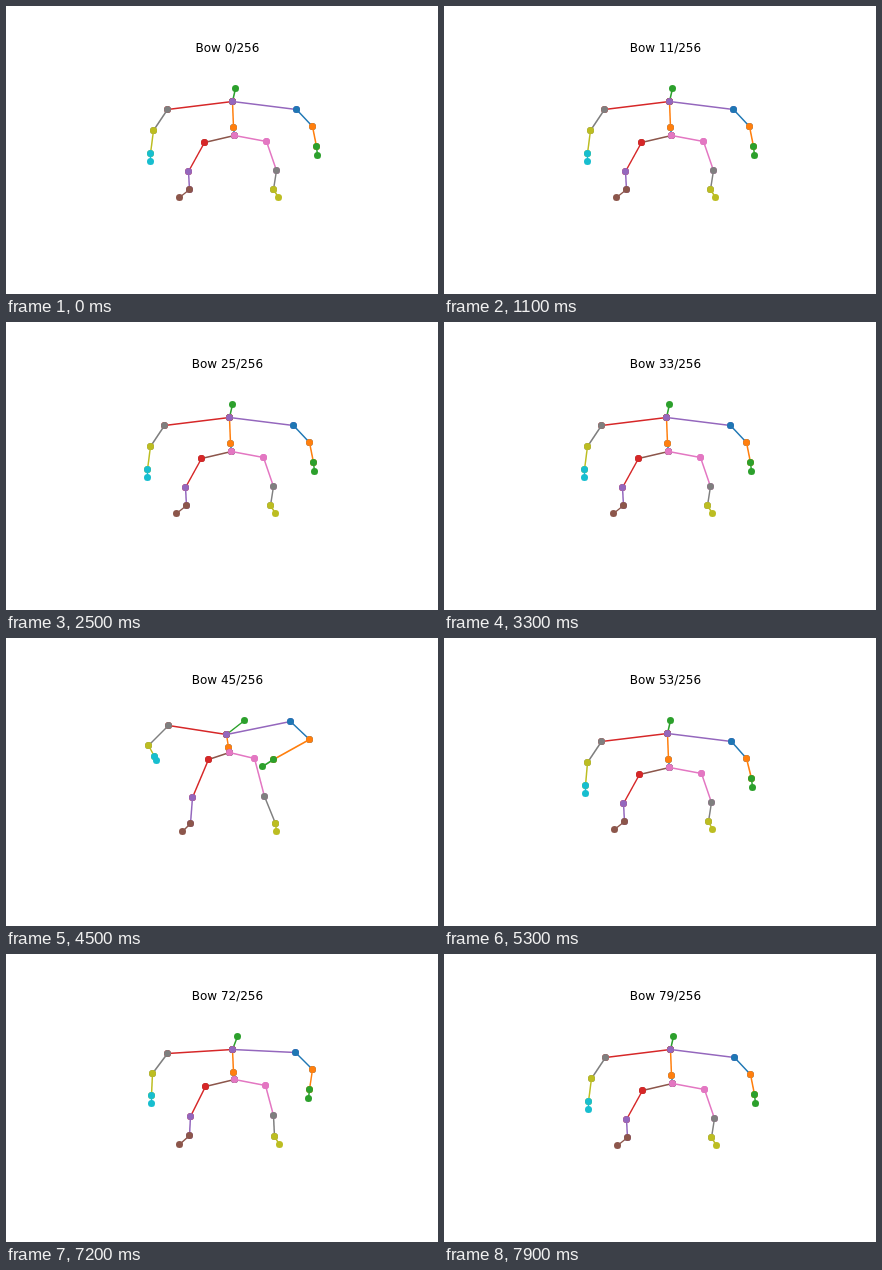
An HTML page with a canvas for the animation above (8 s loop, 432 px wide and 288 px high).

```html
<!DOCTYPE html>
<html lang="en">
<head>
<meta charset="utf-8">
<title>Bow</title>
<style>
  html, body { margin: 0; width: 100%; height: 100%; overflow: hidden; background: #fff; }
  canvas, svg { position: absolute; left: 0; top: 0; display: block; }
  text { font: 12px "DejaVu Sans", sans-serif; text-anchor: middle; fill: #000; }
</style>
</head>
<body>
<canvas id="stage" width="432" height="288"></canvas>
<svg width="432" height="288"><text id="title" x="221.4" y="46">Bow 0/256</text></svg>
<script>
const ctx = document.getElementById('stage').getContext('2d');
const title = document.getElementById('title');
const STEP = 100, COUNT = 80, TOTAL = 256;

const COLORS = ['#1f77b4', '#ff7f0e', '#2ca02c', '#d62728', '#9467bd',
  '#8c564b', '#e377c2', '#7f7f7f', '#bcbd22', '#17becf'];

// Four joints per limb, from the body outwards; the trunk is hip, spine, neck, head.
const LIMBS = ['trunk', 'armL', 'armR', 'legL', 'legR'];
const STAND = {
  trunk: [[226, 129], [225, 121], [224, 95], [227, 82]],
  armL: [[158.5, 103], [144.5, 123.5], [142, 146.5], [142, 155]],
  armR: [[288, 103], [303.5, 120], [308, 140], [309, 149]],
  legL: [[196, 135.5], [180, 165], [181, 182.5], [171, 191]],
  legR: [[258, 135], [268, 164], [265, 183], [269.5, 191]]
};
const BENT = {
  trunk: [[225, 118], [224, 115], [221, 97], [250, 82]],
  armL: [[171, 87], [144, 106], [161, 102], [166, 101]],
  armR: [[284, 84], [307, 102], [242, 122], [222, 128]],
  legL: [[210, 125], [193, 169], [190, 201], [183, 210]],
  legR: [[244, 125], [255, 168], [275, 201], [274, 209]]
};

// reach: how far the left arm follows; wide: how much the knees turn in and feet out
const BOWS = [
  { from: 12, to: 25, reach: 1, wide: 0 },
  { from: 35, to: 47.8, reach: 0.75, wide: 0 },
  { from: 61, to: 73, reach: 0.5, wide: 1 }
];
const RAMP = 5, LIFT = 9, SAG = 6, SWAY = 2.3;
const STANCE = [7, -11, 5, 10];

const chain = i => [[i, i + 1], [i + 1, i + 2], [i + 2, i + 3]];
const BONES = [...chain(0), [2, 4], [2, 8], [0, 12], [0, 16],
  ...chain(4), ...chain(8), ...chain(12), ...chain(16)];

const mix = (a, b, k) => a + (b - a) * k;

function ease(u) {
  u = Math.min(1, Math.max(0, u));
  return u * u * (3 - 2 * u);
}

function poseAt(n) {
  const bow = BOWS.find(b => n <= b.to) || BOWS[BOWS.length - 1];
  const k = ease(Math.min(n - bow.from, bow.to - n) / RAMP);
  const lift = LIFT * 4 * k * (1 - k);
  const wide = bow.wide * k;
  const sway = SWAY * Math.cos(2 * Math.PI * n / COUNT);

  return LIMBS.flatMap(limb => STAND[limb].map(([sx, sy], j) => {
    const [bx, by] = BENT[limb][j];
    const follow = limb === 'armL' ? k * bow.reach : k;
    const leg = limb.startsWith('leg');
    const upper = limb === 'trunk' && j > 1;
    const sags = limb === 'armR' || (leg && j === 0) || (limb === 'trunk' && !upper);
    let x = mix(sx, bx, follow) + sway;
    let y = mix(sy, by, follow);
    if (!upper) y -= lift;
    if (sags) y += SAG * wide;
    if (leg) x += STANCE[j] * wide * (limb === 'legL' ? -1 : 1);
    return [Math.round(x) + 0.5, Math.round(y) + 0.5];
  }));
}

function dot([x, y]) {
  ctx.beginPath();
  ctx.arc(x, y, 3.5, 0, Math.PI * 2);
  ctx.fill();
}

function draw(n) {
  const joints = poseAt(n);
  ctx.fillStyle = '#fff';
  ctx.fillRect(0, 0, 432, 288);
  ctx.lineWidth = 1.5;
  BONES.forEach(([a, b], i) => {
    ctx.strokeStyle = ctx.fillStyle = COLORS[i % COLORS.length];
    ctx.beginPath();
    ctx.moveTo(...joints[a]);
    ctx.lineTo(...joints[b]);
    ctx.stroke();
    dot(joints[a]);
    dot(joints[b]);
  });
  title.textContent = `Bow ${n}/${TOTAL}`;
}

let start = null;
function tick(now) {
  if (start === null) start = now;
  draw(Math.floor((now - start) / STEP) % COUNT);
  requestAnimationFrame(tick);
}
draw(0);
requestAnimationFrame(tick);
</script>
</body>
</html>
```
